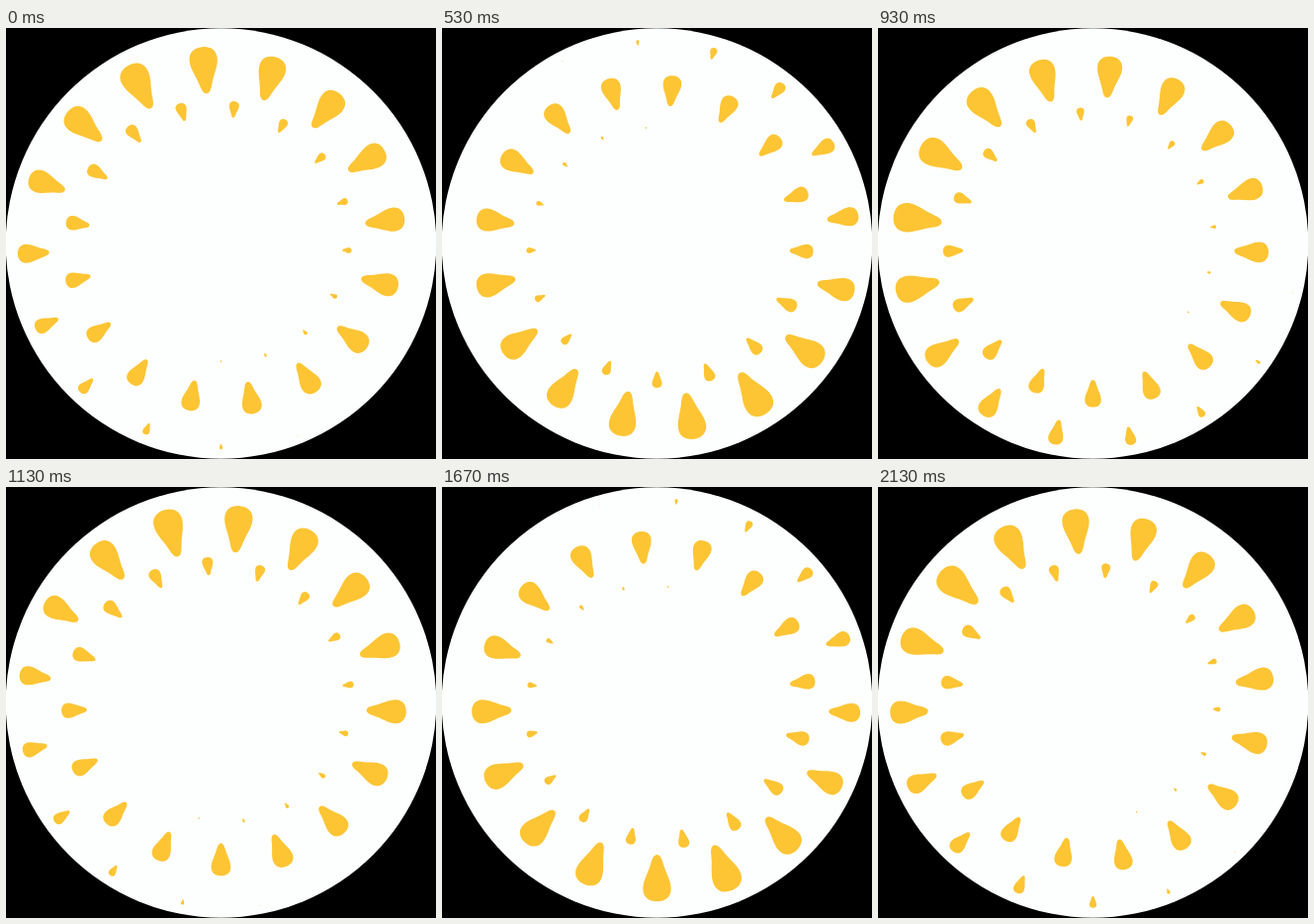
An HTML page that plays this animation: 435x436 px, repeating every 2200 ms.

```html
<!DOCTYPE html>
<html lang="en">
<head>
<meta charset="utf-8">
<title>Drop burst</title>
<style>
  html, body { margin: 0; width: 100%; height: 100%; overflow: hidden; background: #000; }
  svg { display: block; width: 100vw; height: 100vh; }
</style>
</head>
<body>
<svg viewBox="0 0 435 436">
  <circle cx="217.5" cy="218" r="217.8" fill="#fdfffe"/>
  <g transform="translate(217.5 218.8)"><g id="burst" fill="#fdc534"></g></g>
</svg>
<script>
const LOOP = 2200;
const STEPS = 33;
const TURN = 720 / STEPS;   // two turns of the spiral per loop
const PEAK = 26.3;          // age at which a drop stops growing

// Unit drop: tip at the origin, round base at y = 1
const DROP = 'M0 0C.07 0 .1 .08 .13 .18C.19 .4 .3 .55 .3 .73' +
             'C.3 .91 .17 1 0 1C-.17 1 -.3 .91 -.3 .73C-.3 .55 -.19 .4 -.13 .18C-.1 .08 -.07 0 0 0Z';

const burst = document.getElementById('burst');

// Distance of both ends of a drop from the centre at a given age in steps
function span(age) {
  const late = Math.max(0, age - PEAK);
  const early = age - late;
  return {
    tip: 117 + 1.45 * early + 7 * late,
    base: 119.3 + 3.25 * early + 0.4 * late
  };
}

for (let age = -1; age <= 34; age++) {
  const { tip, base } = span(age);
  const drop = document.createElementNS('http://www.w3.org/2000/svg', 'path');
  drop.setAttribute('d', DROP);
  drop.setAttribute('transform',
    `rotate(${-age * TURN}) translate(0 ${tip}) scale(${base - tip})`);
  burst.append(drop);
}

// Turning the spiral by one spoke ages the drop on every spoke by one step
function draw(time) {
  const step = Math.floor((time % LOOP + 3.5) * STEPS / LOOP) % STEPS;
  burst.setAttribute('transform', `rotate(${step * TURN})`);
}

const start = performance.now();
function tick() {
  draw(performance.now() - start);
  requestAnimationFrame(tick);
}
tick();
</script>
</body>
</html>
```
